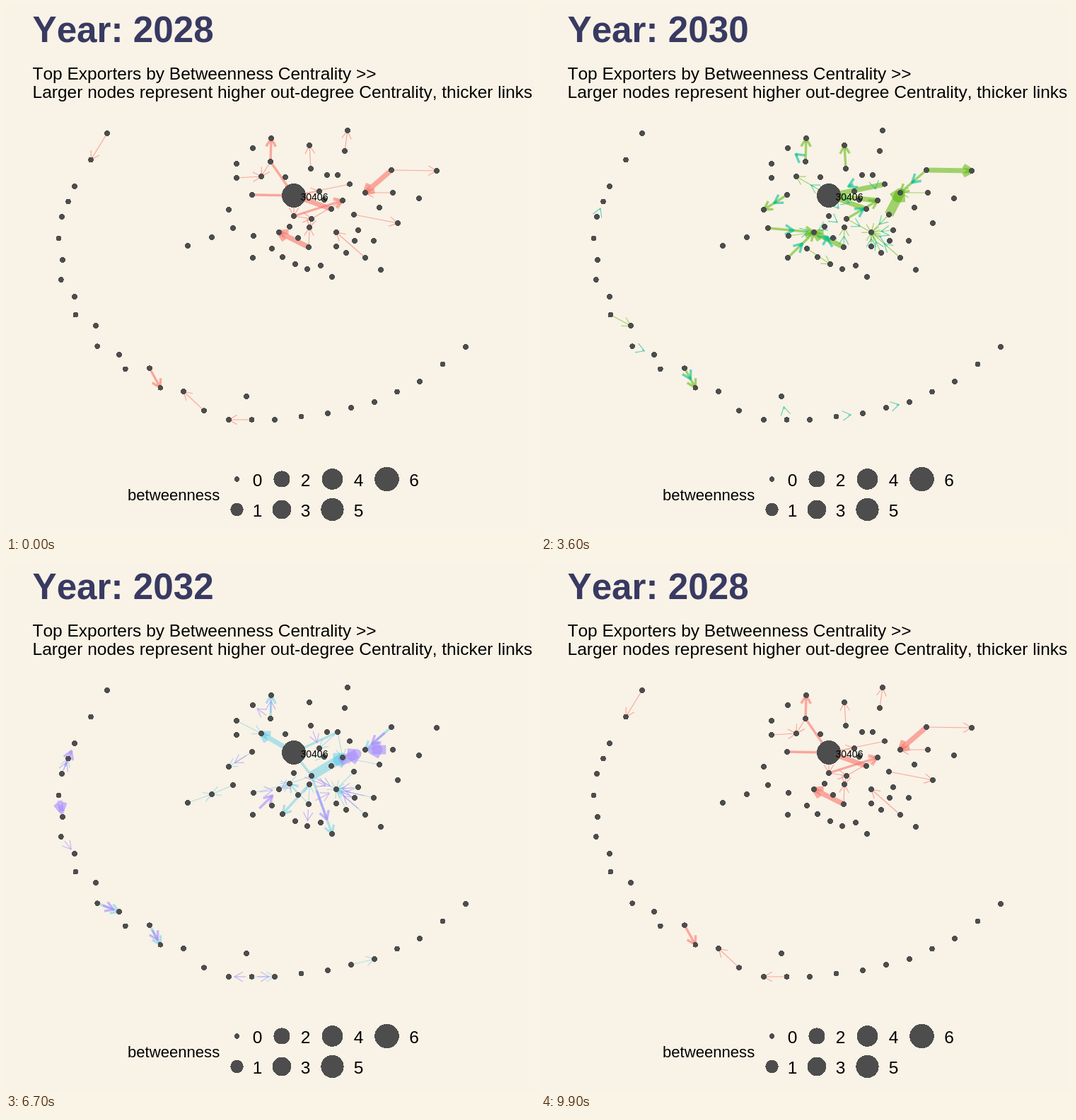
Recreate the animation shown at these times as an HTML page with a canvas. Size 748 px wide and 748 px high, loop 10000 ms.

```html
<!DOCTYPE html>
<html lang="en">
<head>
<meta charset="utf-8">
<title>Betweenness by year</title>
<style>
html, body { margin: 0; width: 100%; height: 100%; overflow: hidden; background: #f9f2e6; }
svg, canvas { position: absolute; left: 0; top: 0; width: 748px; height: 748px; }
text { font-family: "Liberation Sans", Arial, sans-serif; font-kerning: none; white-space: pre; }
circle { fill: #4d4d4d; shape-rendering: crispEdges; }
</style>
</head>
<body>
<canvas id="links" width="748" height="748"></canvas>
<svg id="chart" viewBox="0 0 748 748"></svg>
<script>
const LOOP = 10000, STEP = 100, ALPHA = 0.6, HEAD = 13.5, HUB = 42, FIRST = 2028;
const colors = ['#f8766d', '#c49a00', '#53b400', '#00c094', '#00b6eb', '#a58aff', '#fb61d7'];
const widths = { thin: 1.2, mid: 3.4, bold: 7, huge: 13 };

const pairs = flat => flat.flatMap((v, i) => i % 2 ? [] : [[v, flat[i + 1]]]);

// The outer ring: every second node is a key point.
const ringKeys = pairs([
  143,180, 97,255, 79,298, 80,359, 97,411, 127,452, 160,493, 203,512, 251,545, 315,585,
  380,585, 455,576, 521,560, 585,531, 650,482
]);
// A node between two keys sits midway, pushed outwards at the lower left.
function between([ax, ay], [bx, by]) {
  const x = (ax + bx) / 2, y = (ay + by) / 2;
  const angle = Math.atan2(y - 330, x - 380);
  const push = 17 * Math.max(0, Math.cos((angle - Math.PI * 0.8) * 2));
  return [x + push * Math.cos(angle), y + push * Math.sin(angle)];
}
const ring = ringKeys.flatMap((key, i) => i ? [between(ringKeys[i - 1], key), key] : [key]);

// The stray node below, then the central cluster.
const core = pairs([
  340,552,
  257,339, 291,327, 321,314, 315,288, 348,267, 326,243, 326,223, 349,201, 374,220, 375,187,
  361,241, 395,242, 407,268, 429,197, 431,230, 454,239, 469,239, 483,176, 479,205, 486,252,
  443,262, 450,274, 460,287, 476,275, 508,264, 545,232, 609,233, 547,264, 584,272, 528,285,
  554,307, 492,295, 498,317, 493,332, 520,332, 508,356, 530,373, 467,320, 467,340, 481,349,
  445,367, 461,383, 426,372, 409,365, 391,355, 376,343, 349,356, 350,325, 386,320, 401,312,
  407,297, 432,301, 429,313, 413,328, 428,341
]);
const nodes = [...ring, ...core];

// Links by the years they last and their weight.
const flows = [];
function flow(first, last, groups) {
  for (const weight in groups)
    for (const link of groups[weight].split(' ')) {
      const [from, to] = link.split('>').map(Number);
      flows.push({ first, last, from, to, width: widths[weight] });
    }
}
flow(2028, 2034, { thin: '65>67', mid: '14>15' });
flow(2028, 2032, { thin: '84>82' });
flow(2028, 2030, { mid: '38>39', bold: '52>42 84>78' });
flow(2028, 2029, { thin: '48>47 61>60 17>16 57>54 81>53', mid: '38>42 34>42 80>53', bold: '55>54' });
flow(2028, 2028, { thin: '0>1 35>40 38>40 42>80 80>81 81>82 19>18 49>42 42>50 55>56 44>43' });
flow(2029, 2034, { thin: '62>67 81>67' });
flow(2029, 2031, { thin: '68>67' });
flow(2029, 2030, { thin: '77>78', mid: '44>43', bold: '55>56' });
flow(2029, 2029, { thin: '11>12 48>50' });
flow(2030, 2034, { mid: '55>54' });
flow(2030, 2032, { thin: '69>67 61>67' });
flow(2030, 2031, { thin: '42>40', mid: '32>78 76>78 34>33 81>53' });
flow(2030, 2030, { thin: '9>10 57>54 75>73', bold: '49>42 53>42', huge: '61>54' });
flow(2031, 2034, { thin: '4>3 63>67' });
flow(2031, 2032, { thin: '23>24 46>53 77>79', mid: '46>42' });
flow(2031, 2031, { thin: '11>12 19>29 21>22 42>52 42>81 80>82 79>78', mid: '38>37 75>82 84>78' });
flow(2032, 2034, { thin: '64>67', mid: '11>12' });
flow(2032, 2033, { thin: '19>20 34>33', mid: '81>71' });
flow(2032, 2032, {
  thin: '36>40 32>31 30>31 46>50 42>51 59>53 81>79 84>79 83>79 78>79',
  mid: '38>39 82>74 81>42', bold: '42>40', huge: '81>53'
});
flow(2033, 2034, { thin: '38>37 44>50 77>78 80>67 84>67', mid: '76>78', huge: '57>54' });
flow(2033, 2033, { thin: '38>39 7>8 19>18 84>72 79>78', mid: '4>2', bold: '5>6', huge: '52>54' });
flow(2034, 2034, {
  thin: '13>12 28>27 26>25 32>31 32>33 57>58 84>73 65>66 52>54',
  mid: '5>6 81>70 84>72'
});

const chart = document.getElementById('chart');
const ctx = document.getElementById('links').getContext('2d');
ctx.lineJoin = 'round';

function add(tag, attrs, content = '') {
  const el = document.createElementNS('http://www.w3.org/2000/svg', tag);
  for (const key in attrs) el.setAttribute(key, attrs[key]);
  el.textContent = content;
  chart.append(el);
  return el;
}
const dot = (cx, cy, r) => add('circle', { cx, cy, r });
const label = (x, y, size, content, extra) =>
  add('text', { x, y, 'font-size': size, ...extra }, content);

nodes.forEach(([x, y], i) => dot(x, y, i === HUB ? 17 : 3.8));
label(416.5, 274.5, 14, '30406');
const title = label(37.5, 51, 51.2, '', { 'font-weight': 'bold', fill: '#383a62' });
label(37.5, 103.5, 24.5, 'Top Exporters by Betweenness Centrality >>');
label(37.5, 130, 24.5, 'Larger nodes represent higher out-degree Centrality, thicker links');
label(172, 699, 22.1, 'betweenness');

// Legend: dot area grows evenly with the value.
const columns = [[326.5, 355.5], [390, 423.5], [461.5, 498.5], [538.5, 577]];
for (let value = 0; value <= 6; value++) {
  const [cx, tx] = columns[value >> 1], row = value % 2 * 43;
  dot(cx, 669 + row, 3.7 + 13.6 * Math.sqrt(value / 6));
  label(tx, 679 + row, 24.5, value, { 'text-anchor': 'middle' });
}

function stroke(points) {
  ctx.beginPath();
  points.forEach(([x, y]) => ctx.lineTo(x, y));
  ctx.stroke();
}

// Links grow from their middle; the arrowhead keeps its size.
function drawLink({ from, to, width }, grow) {
  const [ax, ay] = nodes[from], [bx, by] = nodes[to];
  const mx = (ax + bx) / 2, my = (ay + by) / 2;
  const dx = (bx - ax) / 2 * grow, dy = (by - ay) / 2 * grow;
  const tip = [mx + dx, my + dy], angle = Math.atan2(dy, dx);
  const wing = turn => [tip[0] - HEAD * Math.cos(angle + turn), tip[1] - HEAD * Math.sin(angle + turn)];
  ctx.lineWidth = width;
  stroke([[mx - dx, my - dy], tip]);
  stroke([wing(Math.PI / 6), tip, wing(-Math.PI / 6)]);
}

function drawYear(index, grow, alpha) {
  const year = FIRST + index;
  ctx.strokeStyle = colors[index];
  ctx.globalAlpha = alpha;
  flows.filter(f => f.first <= year && year <= f.last).forEach(f => drawLink(f, grow));
}

// A year rests, then changes in 9 steps, or 8 from the fourth year on.
const changes = colors.map((_, i) => i < 4
  ? { start: [600, 2100, 3600, 5000][i], count: i < 3 ? 9 : 8 }
  : { start: 5000 + 1400 * (i - 3), count: 8 });

function render(time) {
  let index = 0, step = 0, count = 1;
  changes.forEach((change, i) => {
    if (time < change.start) return;
    const k = Math.floor((time - change.start) / STEP) + 1;
    [index, step, count] = k < change.count ? [i, k, change.count] : [(i + 1) % colors.length, 0, 1];
  });
  const next = (index + 1) % colors.length, p = step / count;
  ctx.clearRect(0, 0, 748, 748);
  drawYear(index, 1, ALPHA * (1 - p));
  if (p) drawYear(next, p, ALPHA);
  title.textContent = 'Year: ' + (FIRST + (step > Math.ceil(count / 2) ? next : index));
}

const begin = performance.now();
function tick() {
  render((performance.now() - begin) % LOOP);
  requestAnimationFrame(tick);
}
tick();
</script>
</body>
</html>
```
